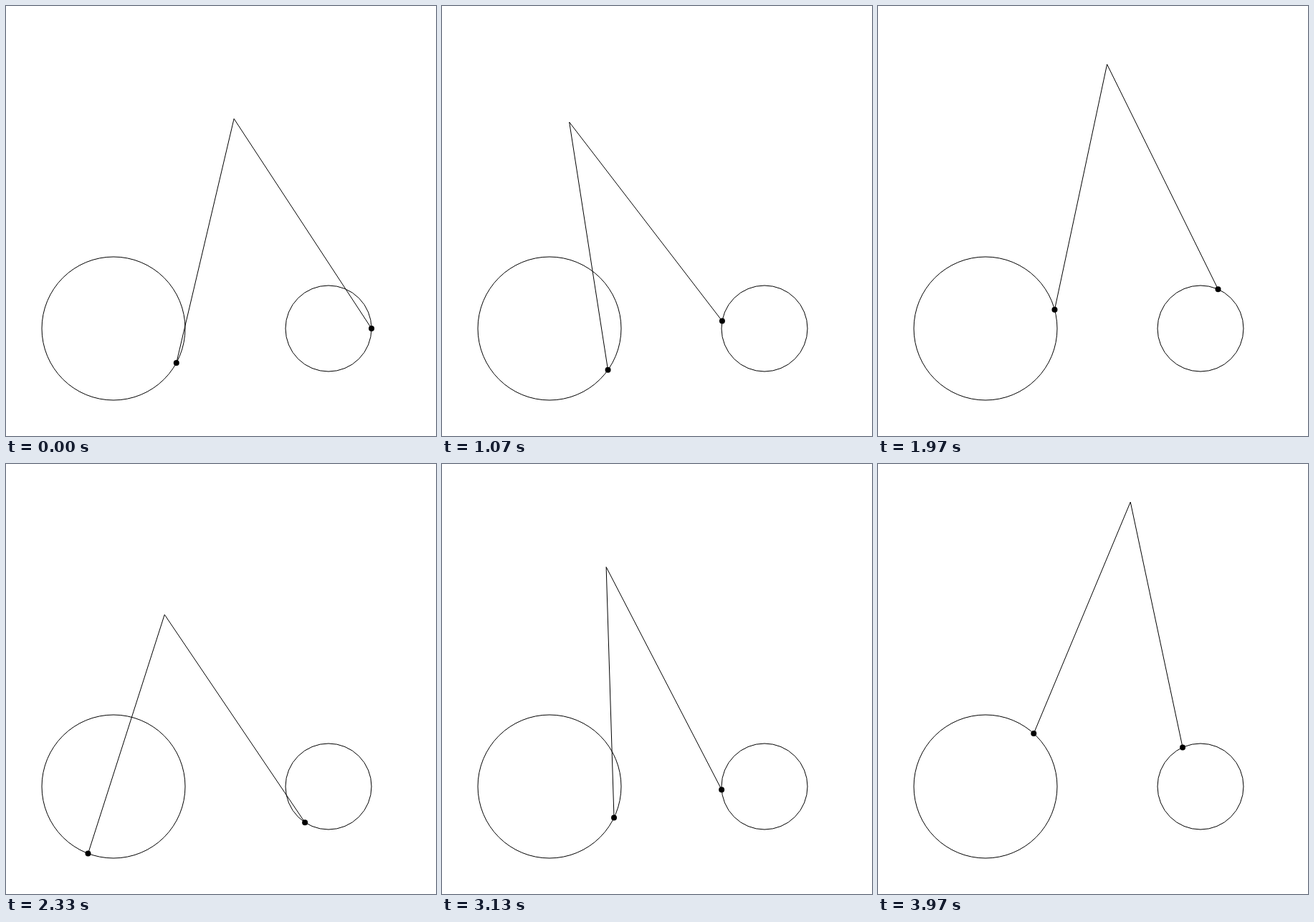
These frames come from a looping animation (600x600 px, 4.01 s). An HTML page with a canvas:

```html
<!DOCTYPE html>
<html lang="en">
<head>
<meta charset="utf-8">
<title>Two cranks and a linkage</title>
<style>
  html, body { margin: 0; width: 100%; height: 100%; overflow: hidden; background: #fff; }
  canvas { display: block; }
</style>
</head>
<body>
<canvas id="stage" width="600" height="600"></canvas>
<script>
  const ctx = document.getElementById("stage").getContext("2d");
  const LOOP = 4010, STEPS = 120, ARM = 350;

  // angles in radians, speed per step
  const left = { x: 150, y: 450, r: 100, start: 0.5, speed: 0.2 };
  const right = { x: 450, y: 450, r: 60, start: 0, speed: 0.3 };

  // 30 steps per second, snapped to hundredths of a second
  const stepTime = n => Math.round(n * 10 / 3) * 10;

  function stepAt(t) {
    let n = Math.min(STEPS - 1, Math.floor(t * 0.03) + 1);
    while (n > 0 && stepTime(n) > t) n--;
    return n;
  }

  function pinOf(wheel, n) {
    const a = wheel.start + wheel.speed * n;
    return { x: wheel.x + wheel.r * Math.cos(a), y: wheel.y + wheel.r * Math.sin(a) };
  }

  // upper meeting point of two equal arms
  function apexOf(p, q) {
    const dx = q.x - p.x, dy = q.y - p.y, d = Math.hypot(dx, dy);
    const h = Math.sqrt(ARM * ARM - d * d / 4) / d;
    return { x: (p.x + q.x) / 2 + dy * h, y: (p.y + q.y) / 2 - dx * h };
  }

  function circle(x, y, r) {
    ctx.beginPath();
    ctx.arc(x, y, r, 0, Math.PI * 2);
  }

  function draw(t) {
    const n = stepAt(t % LOOP);
    const p = pinOf(left, n), q = pinOf(right, n), apex = apexOf(p, q);

    ctx.fillStyle = "#fff";
    ctx.fillRect(0, 0, 600, 600);
    ctx.fillStyle = ctx.strokeStyle = "#000";
    ctx.lineWidth = 1;

    for (const w of [left, right]) {
      circle(w.x, w.y, w.r);
      ctx.stroke();
    }
    for (const pin of [p, q]) {
      circle(pin.x, pin.y, 4);
      ctx.fill();
    }
    ctx.beginPath();
    ctx.moveTo(p.x, p.y);
    ctx.lineTo(apex.x, apex.y);
    ctx.lineTo(q.x, q.y);
    ctx.stroke();
  }

  let begin = null;
  function tick(now) {
    if (begin === null) begin = now;
    draw(now - begin);
    requestAnimationFrame(tick);
  }
  draw(0);
  requestAnimationFrame(tick);
</script>
</body>
</html>
```
